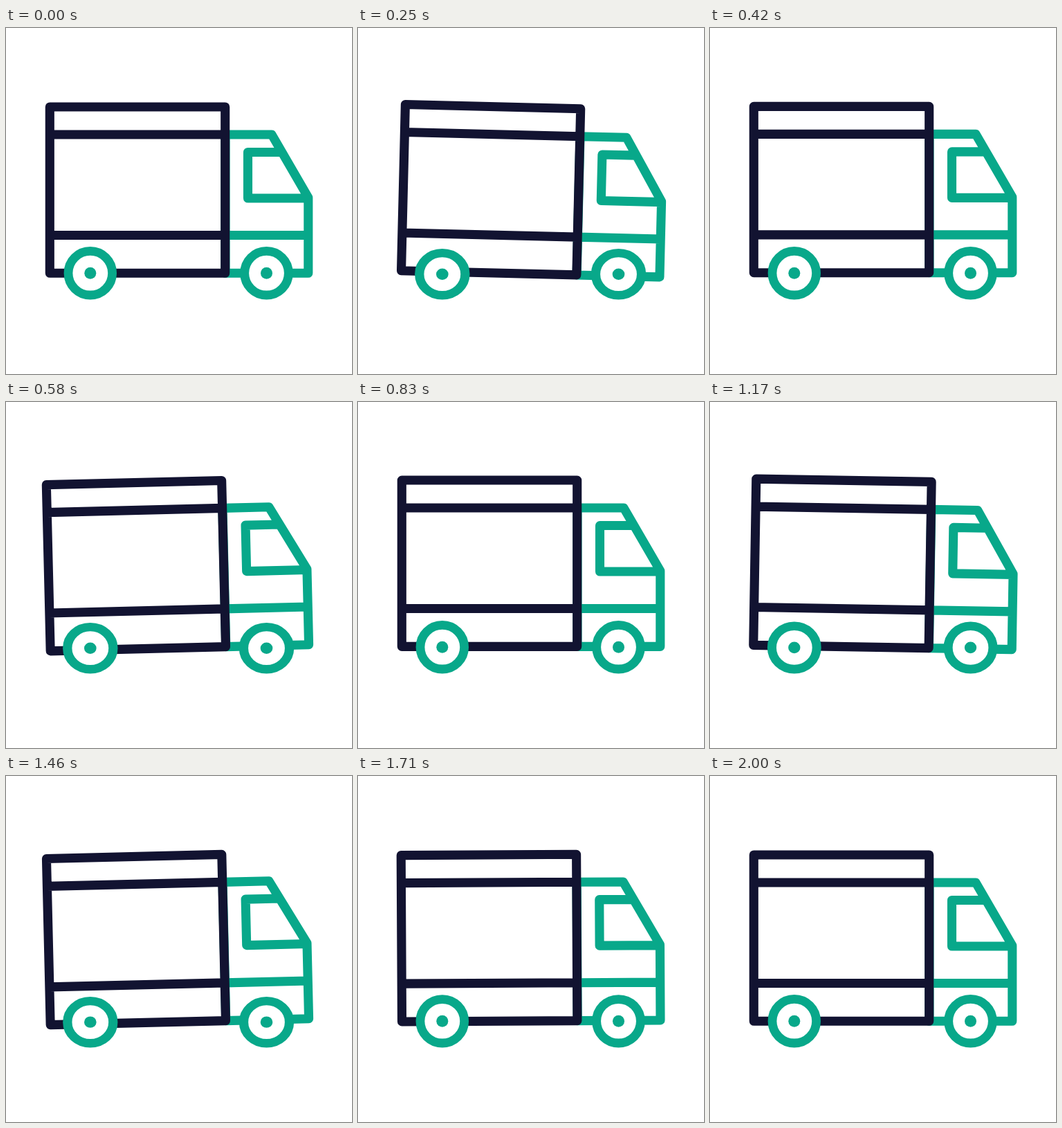
Animation, 500 px wide and 500 px high, one loop 2.04 s. Source, as an HTML page:

```html
<!DOCTYPE html>
<html lang="en">
<head>
<meta charset="utf-8">
<title>Delivery truck</title>
<style>
  html, body { margin: 0; width: 100%; height: 100%; overflow: hidden; background: #fff; }
  svg { display: block; width: 100vw; height: 100vh; }
  .line { fill: none; stroke-width: 13.1; stroke-linecap: round; stroke-linejoin: round; }
  .cab { stroke: #08a88a; }
  .box { stroke: #121331; }
  .tyre { fill: #fff; stroke: #08a88a; stroke-width: 12.8; }
  .hub { fill: #08a88a; }
</style>
</head>
<body>
<svg viewBox="0 0 500 500">
  <g id="truck">
    <path class="line cab" d="M317 154H384L436.8 245V354.3H317Z M398 179.5H349.5V246H436.8 M317 299.5H436.8"/>
    <path class="line box" d="M63.3 114H316.7V354.3H63.3Z M63.3 154H316.7 M63.3 299.5H316.7"/>
  </g>
  <g class="wheel" data-x="121.8">
    <circle class="tyre" cy="-38" r="31.8"/><circle class="hub" cy="-38" r="8.5"/>
  </g>
  <g class="wheel" data-x="376.5">
    <circle class="tyre" cy="-38" r="31.8"/><circle class="hub" cy="-38" r="8.5"/>
  </g>
</svg>
<script>
  const LOOP = 2040, STEP = 1000 / 24, LAST = 48;
  const GROUND = 392.2, TILT = 1.4, SQUASH = 0.04;

  // Steps at which the rocking turns: rest, nose down, nose up, down, up, rest.
  const TURNS = [0, 6, 14, 26, 34, 44];

  const truck = document.getElementById("truck");
  const wheels = [...document.querySelectorAll(".wheel")];

  const ease = p => p * p * (3 - 2 * p);

  function level(i) {
    if (i === 0 || i === TURNS.length - 1) return 0;
    return i % 2 ? 1 : -1;
  }

  // Rocking from -1 to 1, eased between the turns.
  function swingAt(n) {
    const i = TURNS.findIndex(turn => turn > n);
    if (i < 0) return 0;
    const p = (n - TURNS[i - 1]) / (TURNS[i] - TURNS[i - 1]);
    return level(i - 1) + (level(i) - level(i - 1)) * ease(p);
  }

  function draw(ms) {
    const n = Math.min(LAST, Math.floor((ms % LOOP + 3.4) / STEP));
    const swing = swingAt(n);
    // The load presses down at each turn and springs up between them.
    const load = swing * swing;
    const drop = load - (1 - load) ** 2 * Math.sin(Math.PI * n / LAST);
    truck.setAttribute("transform", `translate(0 ${drop}) rotate(${TILT * swing} 250 320)`);
    const s = SQUASH * load;
    for (const w of wheels)
      w.setAttribute("transform", `translate(${w.dataset.x} ${GROUND}) scale(${1 + s} ${1 - s})`);
  }

  const start = performance.now();
  function tick() {
    draw(performance.now() - start);
    requestAnimationFrame(tick);
  }
  tick();
</script>
</body>
</html>
```
